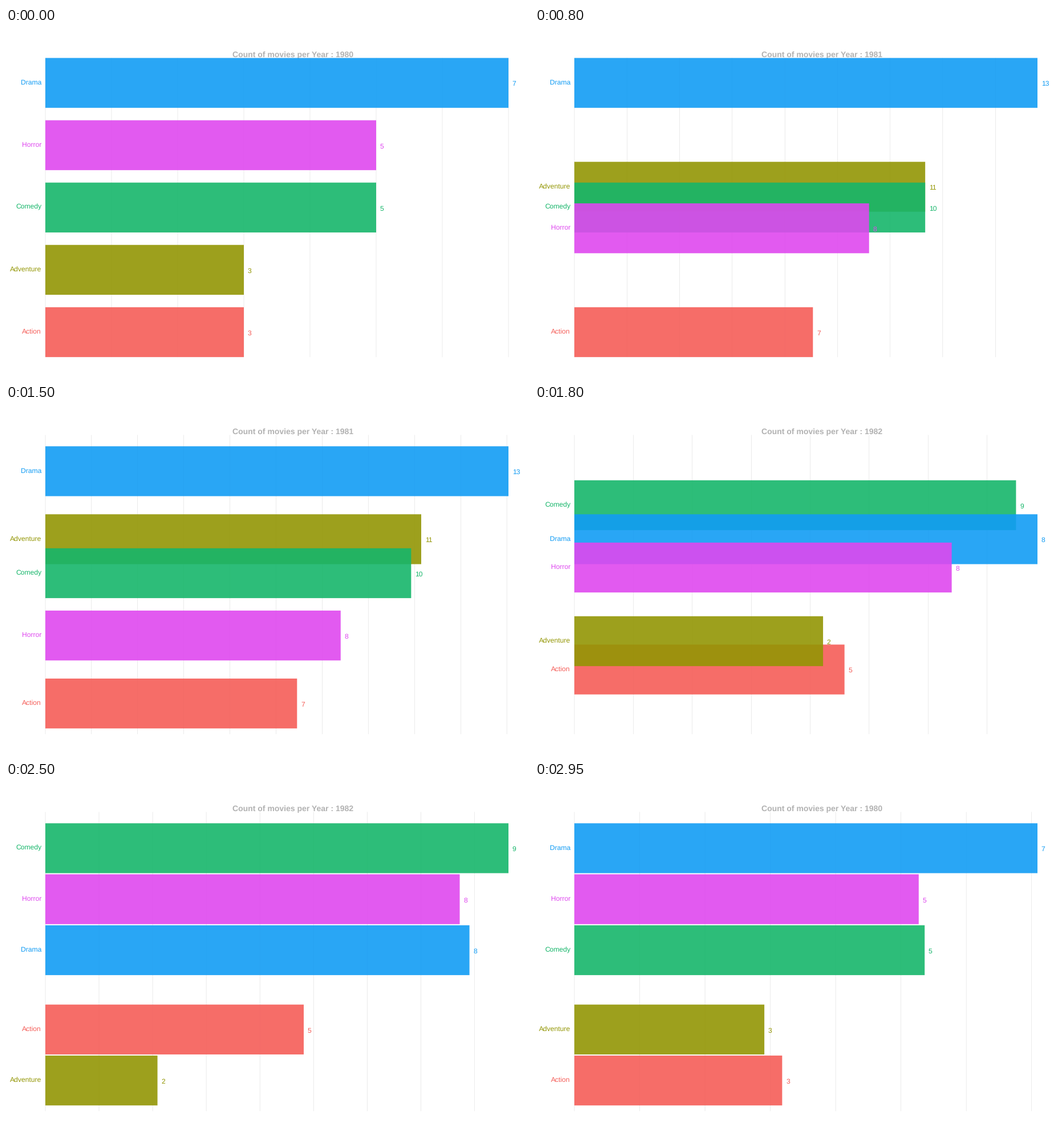
Write a matplotlib script that moves like this. It is 917 px wide and 611 px high and loops after 3000 ms.

```python
import numpy as np
import matplotlib.pyplot as plt
from matplotlib.animation import FuncAnimation
from matplotlib.patches import Rectangle

W, H, DPI = 917, 611, 64
PT = 72 / DPI                       # points per pixel
FRAMES, INTERVAL = 60, 50

LEFT, RIGHT = 69, 881               # panel edges
TOP, BOTTOM = 52.45, 576.15
ROW, BAR_H = 109.1, 87.3
GREY = "#b2b2b2"

plt.rcParams["font.family"] = "Liberation Sans"
plt.rcParams["text.hinting"] = "none"

# Drawing order, back to front
GENRES = {
    "Action": "#f55d58",
    "Adventure": "#939604",
    "Comedy": "#16b66a",
    "Drama": "#129cf4",
    "Horror": "#df48ef",
}
YEARS = [1980, 1981, 1982]
COUNTS = np.array([[3, 3, 5, 7, 5], [7, 11, 10, 13, 8], [5, 2, 9, 8, 8]])
RANKS = np.array([[1, 2, 3, 5, 4], [1, 4, 3, 5, 2], [2, 1, 5, 3, 4]])
MOVES = [(8, 20), (29, 40), (49, 60)]   # first and last frame of each change


def phase(frame):
    """Current state, next state and progress between them."""
    for i, (start, end) in enumerate(MOVES):
        if frame < end:
            t = max(0, frame - start) / (end - start)
            return i, (i + 1) % len(YEARS), t
    return 0, 0, 0


def tick_step(peak):
    """Nicest tick step for an axis from 0 to peak, aiming at five ticks."""
    best = (-np.inf, 1)
    for i, step in enumerate([1, 5, 2, 2.5, 4, 3]):
        for k in range(2, 16):
            last = step * (k - 1)
            simple = 2 - i / 5 - 1
            cover = 1 - 50 * (1 - last / peak) ** 2
            ratio = max(last, peak) / (4 * step)
            dense = 2 - max(ratio, 1 / ratio)
            score = 0.25 * simple + 0.2 * cover + 0.5 * dense
            best = max(best, (score, step))
    return best[1]


fig = plt.figure(figsize=(W / DPI, H / DPI), dpi=DPI, facecolor="white")
ax = fig.add_axes([0, 0, 1, 1])
ax.set_xlim(0, W)
ax.set_ylim(H, 0)
ax.axis("off")

lines = [ax.plot([LEFT, LEFT], [TOP, BOTTOM], color=GREY, lw=0.26 * PT,
                 snap=False, solid_capstyle="butt", zorder=1)[0]
         for _ in range(16)]
title = ax.text(397.4, 51, "", size=14.05 * PT, weight="bold", color=GREY,
                va="baseline", zorder=2)

bars, names, values = [], [], []
for n, (genre, color) in enumerate(GENRES.items()):
    bar = Rectangle((LEFT, 0), 0, BAR_H, facecolor=color, alpha=0.9,
                    linewidth=0, snap=False, zorder=3 + n)
    bars.append(ax.add_patch(bar))
    style = dict(size=12.1 * PT, color=color, va="baseline", zorder=10)
    names.append(ax.text(62.1, 0, genre, ha="right", **style))
    values.append(ax.text(0, 0, "", ha="left", **style))


def draw(frame):
    a, b, t = phase(frame)
    counts = COUNTS[a] + (COUNTS[b] - COUNTS[a]) * t
    ranks = RANKS[a] + (RANKS[b] - RANKS[a]) * t
    shown = a if t < 0.5 else b
    peak = counts.max()
    scale = (RIGHT - LEFT) / peak

    title.set_text(f"Count of movies per Year : {YEARS[shown]}")
    half = tick_step(peak) / 2
    for i, line in enumerate(lines):
        x = LEFT + i * half * scale
        line.set_xdata([x, x])
        line.set_visible(i * half <= peak)

    for n, bar in enumerate(bars):
        y = TOP + (5 - ranks[n]) * ROW
        mid = y + BAR_H / 2
        width = counts[n] * scale
        bar.set_y(y)
        bar.set_width(width)
        names[n].set_y(mid + 2.7)
        values[n].set_position((LEFT + width + 6.7, mid + 5.2))
        values[n].set_text(str(COUNTS[shown][n]))
    return [title, *lines, *bars, *names, *values]


anim = FuncAnimation(fig, draw, frames=FRAMES, interval=INTERVAL,
                     init_func=lambda: draw(0), repeat=True, repeat_delay=0)
plt.show()
```
